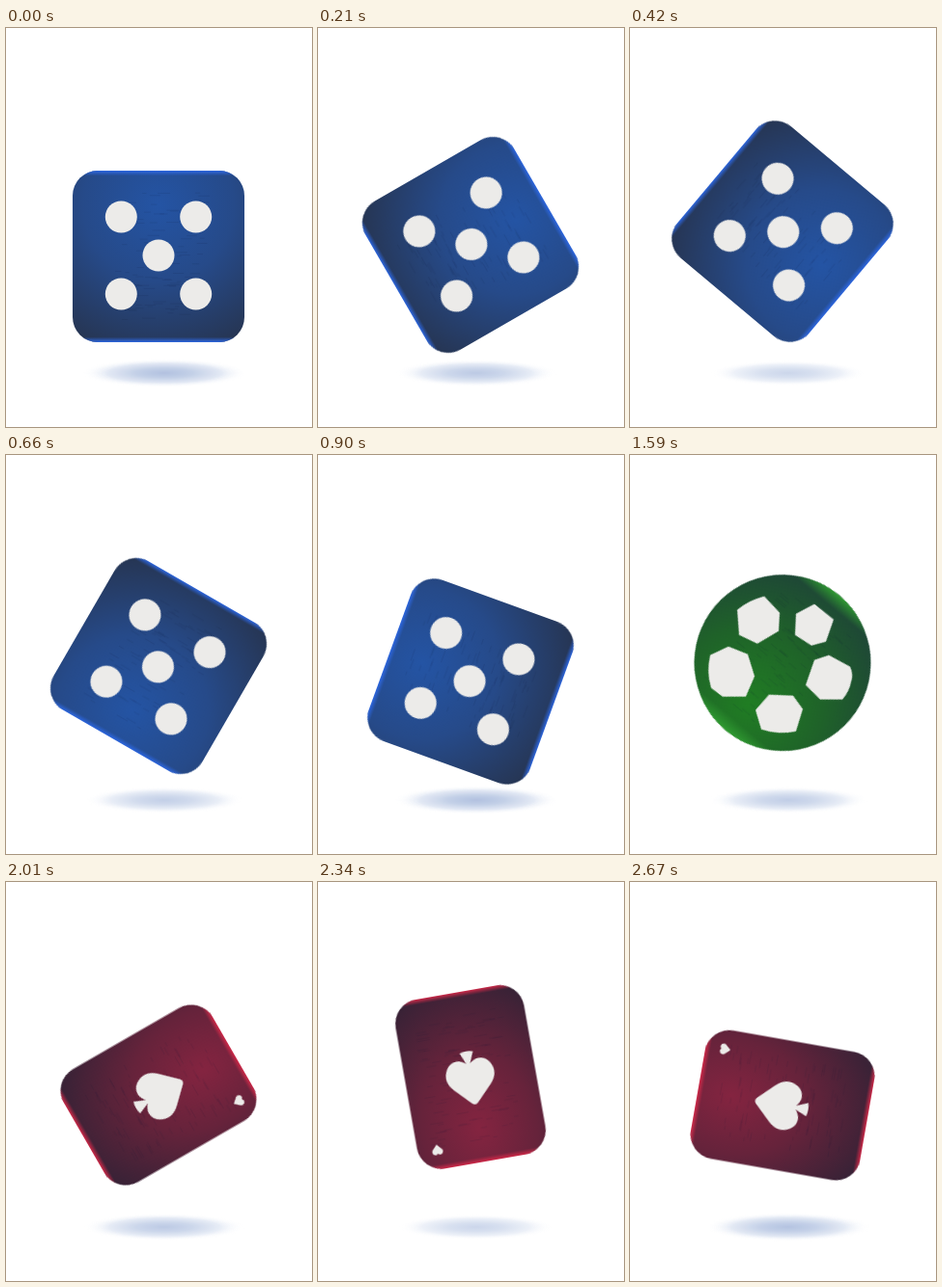
Animation of 317 by 414 pixels, one loop 2.7 s. Source, as an HTML page:

```html
<!DOCTYPE html>
<html lang="en">
<head>
<meta charset="utf-8">
<title>Tumbling game pieces</title>
<style>
  html, body { margin: 0; width: 100%; height: 100%; overflow: hidden; background: #fff; }
  svg { display: block; width: 317px; height: 414px; }

  .piece { animation: 2.7s step-end infinite; }
  .rise  { animation: rise 2.7s steps(15) var(--lag) infinite; }
  .spin  { animation: spin 2.7s steps(30) var(--lag) infinite; }
  .die   { --lag: 0s;    --lift: -30px; animation-name: show-die; }
  .ball  { --lag: -1.8s; --lift: -40px; animation-name: show-ball; }
  .card  { --lag: -.9s;  --lift: -40px; animation-name: show-card; }
  .shadow { animation: shadow .9s steps(15) -.87s infinite; }
  .marks { fill: #ecebe9; }
  .grain { fill: none; stroke: #0c1430; stroke-opacity: .13; stroke-width: .8; }

  /* each piece waits 30 ms, then tumbles for 900 ms */
  @keyframes spin {
    0%, 1.1111% { transform: rotate(0deg); }
    34.4444%, 100% { transform: rotate(300deg); }
  }
  @keyframes rise {
    0%, 1.1111% { transform: translateY(0); }
    17.7778% { transform: translateY(var(--lift)); }
    34.4444%, 100% { transform: translateY(0); }
  }
  @keyframes shadow {
    0%, 100% { transform: scale(1); opacity: 1; }
    50% { transform: scale(.92, .85); opacity: .6; }
  }
  @keyframes show-die {
    0% { visibility: visible; }
    34.4444%, 100% { visibility: hidden; }
  }
  @keyframes show-ball {
    0% { visibility: hidden; }
    34.4444% { visibility: visible; }
    67.7778%, 100% { visibility: hidden; }
  }
  @keyframes show-card {
    0% { visibility: hidden; }
    67.7778%, 100% { visibility: visible; }
  }
</style>
</head>
<body>
<svg viewBox="0 0 317 414">
  <defs>
    <radialGradient id="blue" cx=".5" cy=".2" r=".88">
      <stop offset="0" stop-color="#2454a4"/>
      <stop offset=".5" stop-color="#264a89"/>
      <stop offset="1" stop-color="#263655"/>
    </radialGradient>
    <radialGradient id="green" cx=".5" cy=".2" r=".85">
      <stop offset="0" stop-color="#207d23"/>
      <stop offset=".5" stop-color="#1f6229"/>
      <stop offset="1" stop-color="#1e4139"/>
    </radialGradient>
    <radialGradient id="red" cx=".5" cy=".2" r=".88">
      <stop offset="0" stop-color="#842440"/>
      <stop offset=".5" stop-color="#66233b"/>
      <stop offset="1" stop-color="#382236"/>
    </radialGradient>
    <linearGradient id="blueRim" x2="0" y2="1">
      <stop offset="0" stop-color="#2c66e0"/>
      <stop offset=".03" stop-color="#2c66e0" stop-opacity="0"/>
      <stop offset=".97" stop-color="#2c66e0" stop-opacity="0"/>
      <stop offset="1" stop-color="#2c66e0"/>
    </linearGradient>
    <linearGradient id="greenRim" x2="0" y2="1">
      <stop offset="0" stop-color="#2f9a30"/>
      <stop offset=".08" stop-color="#2f9a30" stop-opacity="0"/>
      <stop offset=".92" stop-color="#2f9a30" stop-opacity="0"/>
      <stop offset="1" stop-color="#2f9a30"/>
    </linearGradient>
    <linearGradient id="redRim" x2="0" y2="1">
      <stop offset="0" stop-color="#d02848"/>
      <stop offset=".03" stop-color="#d02848" stop-opacity="0"/>
      <stop offset=".97" stop-color="#d02848" stop-opacity="0"/>
      <stop offset="1" stop-color="#d02848"/>
    </linearGradient>
    <radialGradient id="soft">
      <stop offset="0" stop-color="#b0c0e0"/>
      <stop offset=".35" stop-color="#c3d0e8"/>
      <stop offset=".7" stop-color="#e4eaf5"/>
      <stop offset="1" stop-color="#fff" stop-opacity="0"/>
    </radialGradient>
    <path id="grain" class="grain"/>
    <circle id="pip" r="16.5"/>
  </defs>

  <g transform="translate(164 358)">
    <ellipse class="shadow" rx="86" ry="15" fill="url(#soft)"/>
  </g>

  <g transform="translate(158 237)">
    <g class="piece die"><g class="rise"><g class="spin">
      <rect x="-89" y="-89" width="178" height="178" rx="26" fill="url(#blue)"/>
      <rect x="-89" y="-89" width="178" height="178" rx="26" fill="url(#blueRim)"/>
      <use href="#grain"/>
      <g class="marks">
        <use href="#pip" x="-38.7" y="-41"/>
        <use href="#pip" x="38.7" y="-41"/>
        <use href="#pip" y="-1"/>
        <use href="#pip" x="-38.7" y="39"/>
        <use href="#pip" x="38.7" y="39"/>
      </g>
    </g></g></g>

    <g class="piece ball"><g class="rise"><g class="spin">
      <circle r="91.5" fill="url(#green)"/>
      <circle r="91.5" fill="url(#greenRim)"/>
      <use href="#grain"/>
      <path class="marks" transform="rotate(-130)" d="
        M4-70Q12-74 20-71Q30-69 38-62L38-39 23-24-3-33-8-48Z
        M48-21L71-14Q75 4 69 22L49 28 33 14 34-11Z
        M14 29L35 38 35 62 26 74Q9 79-8 75L-17 56-9 36Z
        M-52 3L-33 4-20 26-29 45-55 47Q-65 35-69 19Z
        M-45-53L-22-45-18-30-29-13-51-14-61-33Z"/>
    </g></g></g>

    <g class="piece card"><g class="rise"><g class="spin">
      <rect x="-67.5" y="-89" width="135" height="178" rx="25.5" fill="url(#red)"/>
      <rect x="-67.5" y="-89" width="135" height="178" rx="25.5" fill="url(#redRim)"/>
      <use href="#grain"/>
      <g class="marks">
        <path d="M-3-27.5Q0-30 3-27.5L19-11C26-4 27 4 23 11C18 20 8 20 2 14L7 26Q0 28-7 26L-2 14C-8 20-18 20-23 11C-27 4-26-4-19-11Z"/>
        <path transform="translate(47 -69)" d="M0 6L-5 .5C-7-3-3-7 0-3.5C3-7 7-3 5 .5Z"/>
      </g>
    </g></g></g>
  </g>
</svg>
<script>
  // faint brushed grain shared by all faces
  let seed = 7;
  const rand = () => (seed = seed * 16807 % 2147483647) / 2147483647;
  const spread = r => ((rand() * 2 - 1) * r).toFixed(1);
  const strokes = Array.from({ length: 110 }, () =>
    `M${spread(45)} ${spread(66)}h${(4 + rand() * 10).toFixed(1)}`);
  document.getElementById('grain').setAttribute('d', strokes.join(''));
</script>
</body>
</html>
```
